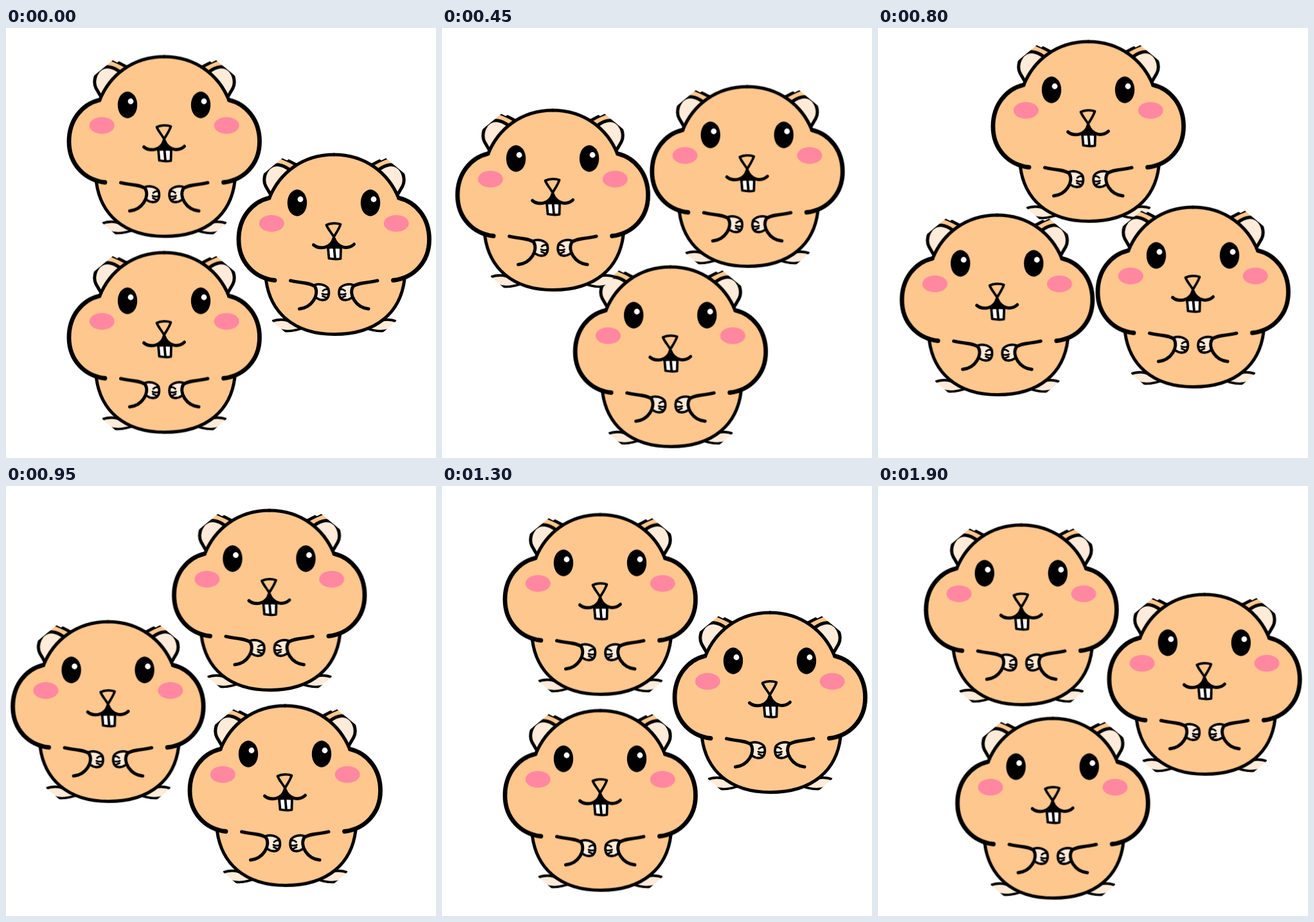
Recreate the animation shown at these times as an HTML page without scripts. Size 669 by 669 pixels, loop 1950 ms.

```html
<!DOCTYPE html>
<html lang="en">
<head>
<meta charset="utf-8">
<title>Hamster carousel</title>
<style>
  html, body { margin: 0; width: 100%; height: 100%; overflow: hidden; background: #fff; }
  svg { display: block; width: 100%; height: 100%; }
  .fur { fill: #fec78e; }
  .cream { fill: #feebd9; }
  .blush { fill: #ff88a0; }
  .line { fill: none; stroke: #000; stroke-width: 5; stroke-linecap: round; stroke-linejoin: round; }
  .bold { stroke-width: 6.8; }
  .thin { stroke-width: 3.8; }
  .fine { stroke-width: 2.8; }
  .rider { animation: orbit 1950ms steps(39) infinite; }
  .rider:nth-child(2) { animation-delay: -650ms; }
  .rider:nth-child(3) { animation-delay: -1300ms; }
  /* the inner counter-turn keeps each hamster upright */
  @keyframes orbit {
    from { transform: rotate(0deg) translate(176px, 0px) rotate(0deg); }
    to { transform: rotate(360deg) translate(176px, 0px) rotate(-360deg); }
  }
</style>
</head>
<body>
<svg viewBox="0 0 669 669">
  <defs>
    <!-- corners of the ears and feet are cut off -->
    <clipPath id="crop">
      <path d="M134 76L166 49.500L173 53L176 51L250 90V340H200L190 319L171 321L150 303L134 200Z"/>
    </clipPath>
    <!-- left half: ear and foot -->
    <g id="limbs" clip-path="url(#crop)">
      <path class="fur" d="M142 71L166 48L190 58L180 72Z"/>
      <path class="line" d="M162 48C171 51 179 55 188 60"/>
      <path class="cream" d="M180 70C170 61 158 57 149 62C139 68 135 83 140 93L147 105Z"/>
      <path class="line" d="M180 70C170 61 158 57 149 62C139 68 135 83 140 93L147 105"/>
      <path class="cream" d="M148 304C158 299 168 300 176 303L194 317L160 318Z"/>
      <path class="line thin" d="M148 304C156 301 166 299 176 303M160 316C170 320 182 319 194 315"/>
    </g>
    <!-- left half: head outline, blush, arm and paw -->
    <g id="front">
      <path class="line" d="M246.500 44C196 44 161 74 146 111"/>
      <path class="line bold" d="M145 111.500C118 118 98 143 98 176C98 212 123 236 154 239.500"/>
      <ellipse class="blush" cx="149.300" cy="151" rx="19.500" ry="13"/>
      <path class="cream" d="M216 247C222 244 234 246 238 253C241 262 238 269 231 271C226 272 222 270 219 267Z"/>
      <path class="line thin" d="M216 247C222 244 234 246 237.500 253C240 262 237 269 231 270C226 271 222 269 219 267"/>
      <path class="line fine" d="M229 256C232 253 235 253 237 254M228 260.500C231 262 234 262 237 261M228.500 264L235 267"/>
      <path class="line" d="M178.500 240C195 244 209 243 216.500 249C224 262 212 282 192.500 284"/>
    </g>
    <g id="eye">
      <ellipse cx="189" cy="119" rx="15.200" ry="20.700"/>
      <circle cx="194" cy="113.500" r="4.400" fill="#fff"/>
    </g>
    <g id="hamster" transform="translate(-246 -184)">
      <use href="#limbs"/>
      <use href="#limbs" transform="translate(493) scale(-1 1)"/>
      <path class="line fur" style="fill:#fec78e" d="M140.500 239C147 288 182 323.500 247 323.500C314 323.500 350 288 356 238"/>
      <path class="fur" d="M246.500 44C196 44 161 74 146 111C118 118 98 143 98 176C98 212 123 236 154 239.500H339C370 236 395 212 395 176C395 143 375 118 347 111C332 74 297 44 246.500 44Z"/>
      <use href="#front"/>
      <use href="#front" transform="translate(492.500) scale(-1 1)"/>
      <use href="#eye"/>
      <use href="#eye" x="114"/>
      <path d="M235 187L246 174L258 187L258 191H235Z"/>
      <path class="line thin" style="fill:#fff" d="M237 189L238.500 205.500C244 206.500 251 207 256.500 206L257 189C251 188 243 188 237 189ZM246.500 189L248 206"/>
      <path class="line" d="M214.500 184.500C224 192 242 190 246 174C252 190 268 192 277.500 183.500"/>
      <path class="line thin" style="fill:#fec78e" d="M234.500 153.500C241 150.500 250 150 256.500 152.500C254 160 249 167 246 172C242 165 237 160 234.500 153.500Z"/>
    </g>
  </defs>
  <g transform="translate(334 337)">
    <g class="rider"><use href="#hamster"/></g>
    <g class="rider"><use href="#hamster"/></g>
    <g class="rider"><use href="#hamster"/></g>
  </g>
</svg>
</body>
</html>
```
